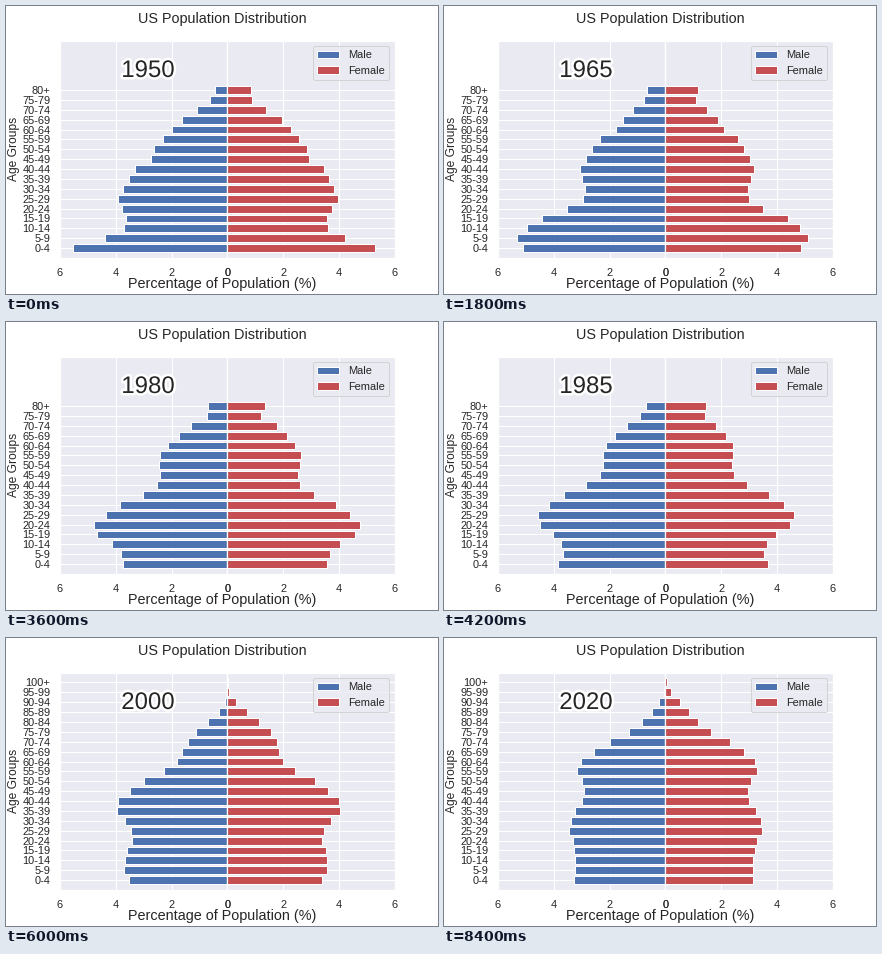
A matplotlib script for the animation above (9 s loop, 432 by 288 pixels).

```python
import numpy as np
import matplotlib.pyplot as plt
from matplotlib import patheffects
from matplotlib.animation import FuncAnimation

INK = ".15"
BLUE, RED = "#4C72B0", "#C44E52"
STEP = 5
YEARS = range(1950, 2021, STEP)
SPLIT_YEAR = 1990   # from here on 80+ is divided into five groups
AGES = np.arange(21)

# Turning points of cohort size: year at age 0-4, millions of boys
COHORTS = [(1870, 2.15), (1885, 4.15), (1900, 4.85), (1905, 4.85),
           (1910, 5.64), (1925, 6.38), (1935, 5.85), (1940, 5.97),
           (1945, 7.06), (1950, 8.9), (1955, 9.8), (1960, 10.5),
           (1965, 10.18), (1970, 9.1), (1975, 8.5), (1980, 8.6),
           (1985, 9.3), (1995, 10.15), (2000, 9.93), (2010, 10.25),
           (2020, 11.0)]


def cohort_counts(year, ratio, arrivals, hazard, worst, rate):
    """Births, growth by migration up to age 30, then Gompertz mortality."""
    born = year - AGES * STEP
    births = ratio * np.interp(born, *zip(*COHORTS))
    inflow = arrivals + .18 * np.clip((born - 1950) / 25, 0, 1)
    grown = 1 + inflow * np.minimum(AGES, 6) / 6
    risk = np.minimum(worst, hazard * np.exp(-.0205 * (born - 1910)))
    return births * grown * np.exp(-risk * np.exp(rate * (AGES - 14)))


def shares(year, count):
    """Percent of the population, men and women, last group open-ended."""
    men = cohort_counts(year, 1, 0, .64, .70, .40)
    women = cohort_counts(year, .955, .06, .333, .45, .44)
    rows = 100 * np.array([men, women]) / (men.sum() + women.sum())
    rows[:, count - 1] = rows[:, count - 1:].sum(axis=1)
    return rows[:, :count]


def age_labels(count):
    spans = [f"{a}-{a + 4}" for a in range(0, (count - 1) * STEP, STEP)]
    return spans + [f"{(count - 1) * STEP}+"]


plt.rcParams.update({
    "font.family": "Liberation Sans", "font.size": 12,
    "text.color": INK, "axes.labelcolor": INK,
    "xtick.color": INK, "ytick.color": INK,
    "axes.facecolor": "#EAEAF2", "axes.edgecolor": "white",
    "axes.linewidth": 1.25, "axes.labelsize": 12, "axes.axisbelow": True,
    "axes.grid": True, "grid.color": "white", "grid.linewidth": 1,
    "xtick.labelsize": 11, "ytick.labelsize": 11, "legend.fontsize": 11,
    "xtick.major.size": 6, "ytick.major.size": 6,
    "xtick.bottom": False, "ytick.left": False,
})

fig, (left, right) = plt.subplots(1, 2, figsize=(6, 4), dpi=72)
fig.subplots_adjust(left=.125, right=.9, bottom=.125, top=.88, wspace=0)
fig.suptitle("US Population Distribution", fontsize=14.4)
fig.supxlabel("Percentage of Population (%)", fontsize=14.4)


def pyramid_side(ax, color, label, xlim):
    bars = ax.barh(AGES, 0 * AGES, height=.8, color=color,
                   edgecolor="white", linewidth=1, label=label)
    ax.set(xlim=xlim, ylim=(-1, 21), xticks=[0, 2, 4, 6])
    return bars


male = pyramid_side(left, BLUE, "Male", (6, 0))
female = pyramid_side(right, RED, "Female", (0, 6))
left.set_ylabel("Age Groups", labelpad=2)
right.legend(handles=[male, female], loc="upper right")
caption = fig.text(142 / 432, 217 / 288, "", fontsize=24, ha="center",
                   va="baseline")
caption.set_path_effects([patheffects.withStroke(linewidth=5,
                                                 foreground="white")])


def draw(i=0):
    year = YEARS[i]
    count = 21 if year >= SPLIT_YEAR else 17
    for bars, row in zip((male, female), shares(year, count)):
        for age, bar in enumerate(bars):
            bar.set_visible(age < count)
            if age < count:
                bar.set_width(row[age])
    left.set_yticks(range(count), age_labels(count))
    right.set_yticks(range(count), [""] * count)
    caption.set_text(str(year))
    return [*male, *female, caption]


anim = FuncAnimation(fig, draw, frames=len(YEARS), init_func=draw,
                     interval=600, repeat=True, repeat_delay=0)
plt.show()
```
